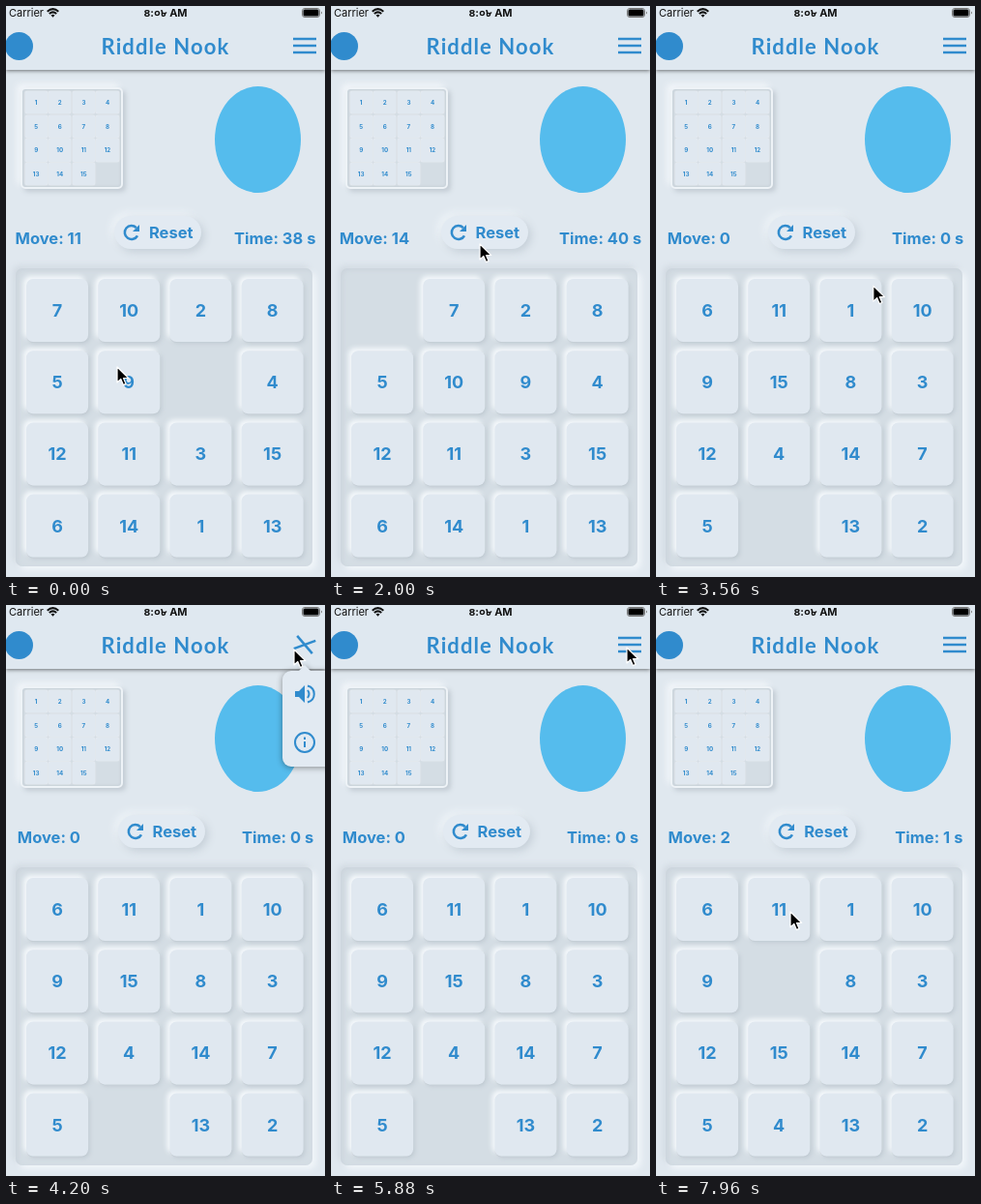
Write an HTML page that moves like this. It is 330 px wide and 590 px high and loops after 8 s.

```html
<!DOCTYPE html>
<html lang="en">
<head>
<meta charset="utf-8">
<title>Sliding puzzle</title>
<style>
  :root { --bg: #e0e8ef; --blue: #308bcd; }
  html, body { margin: 0; width: 100%; height: 100%; overflow: hidden; background: var(--bg); }
  #stage { position: relative; width: 330px; height: 590px; overflow: hidden; background: var(--bg);
    color: var(--blue); font: 700 16.5px/20px Inter, sans-serif; }
  #stage > * { position: absolute; }
  svg { overflow: visible; }
  header { left: 0; top: 0; width: 330px; height: 66px; background: #dfe8f0; box-shadow: 0 1px 4px #0008; }
  header > * { position: absolute; }
  .status { top: 0; height: 15px; color: #111; font-size: 11px; line-height: 15px; white-space: pre; }
  .clock { width: 330px; text-align: center; font-family: Inter, "Noto Sans Bengali", "Noto Sans", sans-serif; }
  h1 { margin: 0; top: 29px; width: 330px; text-align: center; font: 700 22px/26px Lato, sans-serif; letter-spacing: 1.1px; }
  .logo { left: -1px; top: 27px; width: 29px; height: 29px; border-radius: 50%; background: var(--blue); }
  .mascot { left: 216px; top: 83px; width: 89px; height: 110px; border-radius: 50%; background: #55bced; }
  .tile { position: absolute; display: flex; align-items: center; justify-content: center; background: #e0e8f0; }
  .mini { left: 15px; top: 84px; width: 102px; height: 101px; border: 2px solid #eef3f7; border-radius: 5px;
    background: #d4dde4; box-shadow: 3px 3px 5px #c2cbd3, -4px -4px 6px #f1f5f9, inset 0 0 3px #b9c4cd; }
  .mini .tile { width: 23.4px; height: 23.4px; border-radius: 2px; padding-top: 1px; box-sizing: border-box;
    font-size: 6.2px; box-shadow: 0 0 1.5px #fff; }
  .info { left: 0; top: 217px; width: 330px; height: 34px; display: flex; justify-content: space-around; }
  .info span { margin-top: 12.5px; white-space: nowrap; }
  .reset { box-sizing: border-box; width: 90px; height: 34px; margin: 0 15px; padding-left: 36px; position: relative;
    font-size: 16.5px; line-height: 34px; border-radius: 17px; background: #e2eaf2;
    box-shadow: 3px 3px 8px #c4ced7, -3px -3px 8px #f1f6fa; }
  .reset svg { position: absolute; left: 9px; top: 8px; }
  .board { left: 10px; top: 271px; width: 307px; height: 308px; border-radius: 7px; background: #d4dde4;
    box-shadow: inset 2px 2px 5px #cbd4dc, 4px 4px 6px #f1f6fa, -3px -3px 6px #d2dae2; }
  .board .tile { left: 11px; top: 11px; width: 64px; height: 65px; border-radius: 7px; font-size: 18px;
    box-shadow: -3px -3px 5px #f5f9fc, 2px 2px 4px #c2ccd4, 0 1px 1px #bdc7cf; }
  #popup { left: 286px; top: 68px; width: 54px; height: 99px; border-radius: 9px; background: #e2eaf2;
    filter: drop-shadow(0 1px 3px #0006); transform-origin: 23px 0; }
  #cursor { left: -1px; top: -1px; }
</style>
</head>
<body>
<div id="stage">
  <div class="mini"></div>
  <div class="mascot"></div>
  <div class="info">
    <span id="moves"></span>
    <div class="reset">
      <svg width="18" height="18" fill="none" stroke="#308bcd" stroke-width="2.5">
        <path d="M15 12.3A7 7 0 1 1 13.8 4.1"/><path d="M17 1v7h-7z" fill="#308bcd" stroke="none"/>
      </svg>Reset
    </div>
    <span id="timer"></span>
  </div>
  <div class="board"></div>
  <header>
    <div class="status" style="left:3px;font-weight:400">Carrier</div>
    <div class="status clock">৪:০৮ AM</div>
    <svg style="left:42px;top:2px" width="13" height="10" fill="none" stroke="#111" stroke-width="2">
      <path d="M.7 3.7Q6.5 -1.5 12.3 3.7M2.8 6Q6.5 2.8 10.2 6"/><path d="M4.5 7.5Q6.5 6 8.5 7.5L6.5 9.8z" fill="#111" stroke="none"/>
    </svg>
    <svg style="left:306px;top:2px" width="21" height="10">
      <rect x=".5" y=".5" width="18" height="9" rx="2.5" fill="none" stroke="#777"/>
      <rect x="1.5" y="1.5" width="16" height="7" rx="1.5" fill="#000"/><path d="M20 3.5q2 1.5 0 3z" fill="#777"/>
    </svg>
    <div class="logo"></div>
    <h1>Riddle Nook</h1>
    <svg style="left:309px;top:41px" width="1" height="1" stroke="#308bcd" stroke-width="2.5">
      <path id="top" d="M-12 0H12"/><path id="middle" d="M-12 0H12"/><path id="bottom" d="M-12 0H12"/>
    </svg>
  </header>
  <div id="popup">
    <svg width="44" height="99" fill="none" stroke="#308bcd" stroke-width="2">
      <path d="M16 1L23 -6L30 1z" fill="#e2eaf2" stroke="none"/>
      <path d="M13 21h4l6-6v18l-6-6h-4z" fill="#308bcd" stroke="none"/>
      <path d="M26 20Q29 24 26 28M26 15.5C35 18 35 30 26 32.5"/>
      <circle cx="23" cy="74" r="10"/><path d="M23 73v6M23 68.5v2.5"/>
    </svg>
  </div>
  <svg id="cursor" width="14" height="20">
    <path d="M0 0V16L3.8 12.5L6.4 18.6L9.1 17.4L6.5 11.5H11.7z" fill="#000" stroke="#fff" stroke-width="1.2" stroke-linejoin="round"/>
  </svg>
</div>
<script>
const LOOP = 8000, SLIDE = 200, PITCH = 74.2;
const $ = id => document.getElementById(id);
const clamp = x => Math.max(0, Math.min(1, x));
const ease = x => { x = clamp(x); return x * x * (3 - 2 * x); };
const mix = (a, b, k) => a + (b - a) * k;

function addTile(parent, label) {
  const tile = document.createElement('div');
  tile.className = 'tile';
  tile.textContent = label;
  document.querySelector(parent).append(tile);
  return tile;
}

for (let i = 0; i < 15; i++) {
  const { style } = addTile('.mini', i + 1);
  style.left = 2.5 + i % 4 * 24.6 + 'px';
  style.top = 2 + Math.floor(i / 4) * 24.6 + 'px';
}
const tiles = Array.from({ length: 15 }, (_, i) => addTile('.board', i + 1));

// Each state holds its start time, tile order (0 is the gap) and move count.
const states = [{ at: -1000, order: [7, 10, 2, 8, 5, 9, 0, 4, 12, 11, 3, 15, 6, 14, 1, 13], moves: 11 }];
function slide(at, tile) {
  const { order, moves } = states.at(-1);
  states.push({ at, order: order.map(n => n === tile ? 0 : n || tile), moves: moves + 1 });
}
const RESET = 2250, RESTART = 6950;
slide(250, 9);
slide(700, 10);
slide(1350, 7);
states.push({ at: RESET, order: [6, 11, 1, 10, 9, 15, 8, 3, 12, 4, 14, 7, 5, 0, 13, 2], moves: 0 });
slide(RESTART, 4);
slide(7500, 15);

// Time, x and y of the pointer tip.
const pointer = [
  [0, 116, 374], [280, 118, 376], [620, 123, 314], [820, 123, 314], [1250, 62, 312], [1450, 62, 312],
  [2000, 155, 247], [2180, 154, 237], [2350, 154, 237], [2960, 188, 411], [3350, 188, 411],
  [3900, 303, 43], [4200, 299, 47], [4850, 304, 44], [5880, 307, 45], [6000, 307, 45],
  [6550, 129, 460], [6760, 137, 461], [7080, 137, 461], [7420, 136, 392], [7620, 136, 392], [7960, 140, 318]
];

function pointerAt(t) {
  const i = pointer.findIndex(p => p[0] > t);
  if (i < 0) return pointer.at(-1).slice(1);
  const a = pointer[i - 1], b = pointer[i], k = ease((t - a[0]) / (b[0] - a[0]));
  return [mix(a[1], b[1], k), mix(a[2], b[2], k)];
}

function seconds(t) {
  if (t < RESET) return 38 + Math.floor((t + 300) / 1000);
  return t < RESTART ? 0 : Math.floor((t - RESTART + 80) / 1000);
}

function drawBoard(t) {
  const index = states.findLastIndex(s => s.at <= t);
  const now = states[index], before = states[Math.max(0, index - 1)];
  const k = ease((t - now.at) / SLIDE);
  tiles.forEach((tile, i) => {
    const from = before.order.indexOf(i + 1), to = now.order.indexOf(i + 1);
    const x = mix(from % 4, to % 4, k) * PITCH;
    const y = mix(from >> 2, to >> 2, k) * PITCH;
    tile.style.transform = `translate(${x}px, ${y}px)`;
  });
  $('moves').textContent = 'Move: ' + now.moves;
  $('timer').textContent = `Time: ${seconds(t)} s`;
}

function drawMenu(t) {
  const shown = ease((t - 3980) / 150) * (1 - ease((t - 4880) / 150));
  $('popup').style.opacity = shown;
  $('popup').style.transform = `scale(${mix(.8, 1, shown)})`;
  const p = clamp((t - 4024) / 400) * (1 - clamp((t - 4880) / 400));
  const offset = 7 * (1 - clamp(p / .4));
  const swing = 45 * p + 30 * Math.sin(Math.PI * p);
  $('top').setAttribute('transform', `translate(0 ${-offset}) rotate(${swing})`);
  $('bottom').setAttribute('transform', `translate(0 ${offset}) rotate(${-45 * p})`);
  $('middle').style.opacity = 1 - clamp(p / .3);
}

function draw(t) {
  drawBoard(t);
  drawMenu(t);
  const [x, y] = pointerAt(t);
  $('cursor').style.transform = `translate(${x}px, ${y}px)`;
}

const start = performance.now();
function frame() {
  draw((performance.now() - start) % LOOP);
  requestAnimationFrame(frame);
}
frame();
</script>
</body>
</html>
```
